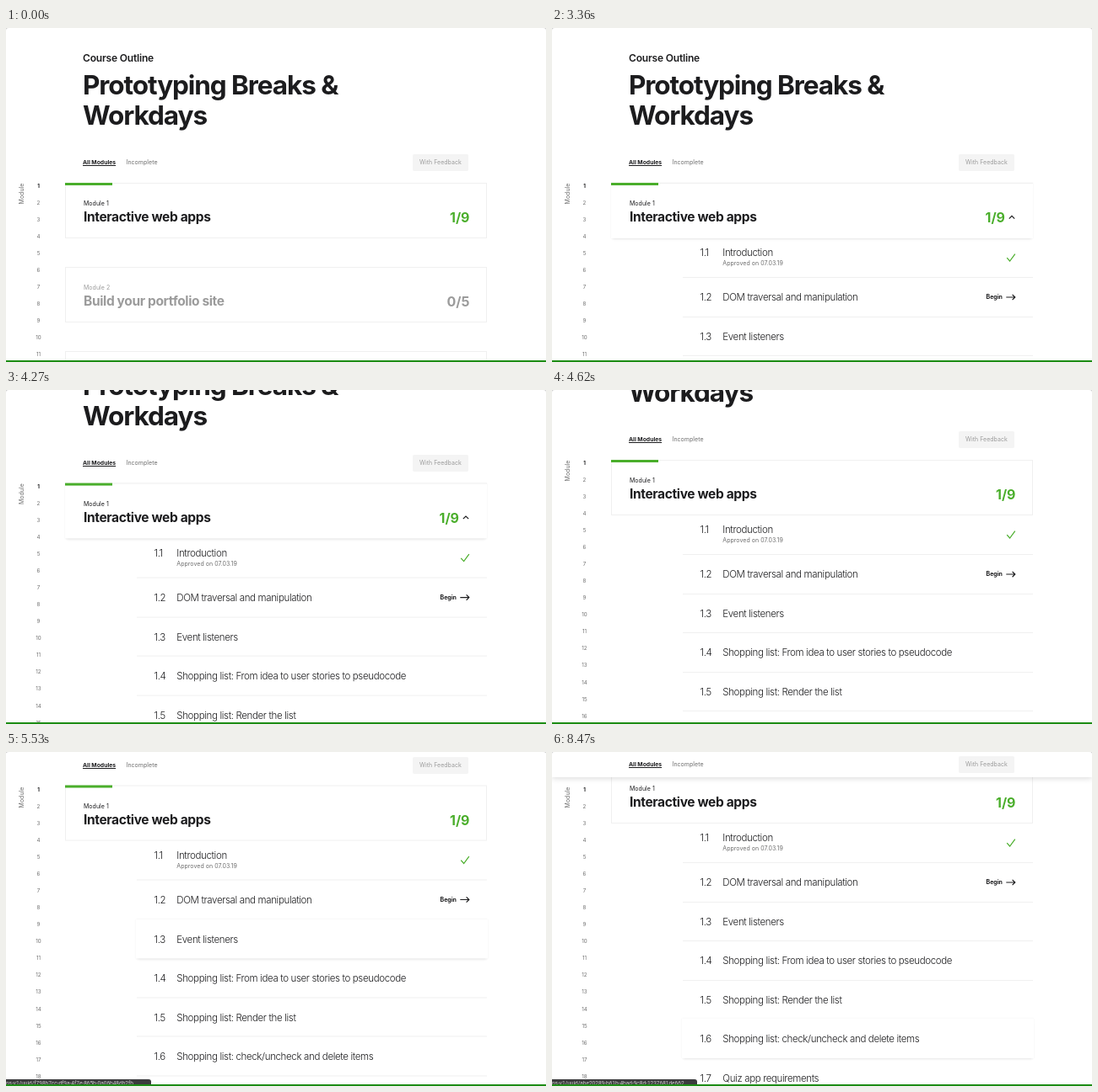
An HTML page that plays this animation: 640x397 px, repeating every 8.61 s.

```html
<!DOCTYPE html>
<html lang="en">
<head>
<meta charset="utf-8">
<title>Course outline</title>
<style>
  html, body { margin: 0; width: 100%; height: 100%; overflow: hidden; background: #ccc; }
  #stage { position: relative; width: 640px; height: 397px; overflow: hidden; background: #fff;
    border-radius: 3px 3px 0 0; color: #1c1c1e; font: 400 7px Inter, sans-serif; }
  #stage div, #stage svg { position: absolute; box-sizing: border-box; }
  /* zero line height centres capitals on the given y */
  .t { white-space: pre; line-height: 0; }
  .small { font-size: 7px; letter-spacing: .005em; }
  .kicker { font-size: 12px; font-weight: 600; letter-spacing: -.015em; }
  .title { font-size: 31.5px; font-weight: 700; letter-spacing: -.034em; }
  .name { font-size: 15.5px; font-weight: 700; letter-spacing: -.023em; }
  .score { font-size: 16px; font-weight: 700; }
  .row { font-size: 11.5px; font-weight: 350; letter-spacing: -.031em; }
  .tab { font-size: 6.8px; font-weight: 700; text-decoration: underline 1px; text-underline-offset: .5px; }
  .bold { font-size: 7px; font-weight: 700; }
  .mute { color: #6d6d6d; }
  .pale { color: #9b9b9b; }
  .green { color: #4aae2b; }
  .card { left: 70px; width: 500px; height: 66px; border: 1px solid #f0f0f0; background: #fff; }
  .lift { background: #fff; box-shadow: 0 3px 3px -2px rgba(0,0,0,.09), 0 0 2px rgba(0,0,0,.06); }
  .rule { left: 155px; width: 415px; height: 1px; background: #f0f0f0; }
  svg { overflow: visible; fill: none; stroke-width: 1.2; }
  #scroll, #side, #rest { left: 0; top: 0; width: 640px; }
  #list { left: 0; top: 250px; width: 640px; overflow: hidden; }
  #rowLift { left: 154px; width: 417px; height: 47px; }
  #headLift { left: 70px; top: 184px; width: 500px; height: 66px; border-top: 1px solid #f0f0f0; }
  #bar { left: 0; width: 640px; height: 30px; background: #fff; }
  #button { left: 482px; top: 5px; width: 66px; height: 20px; background: #f4f4f4; border-radius: 2px; }
  #progress { left: 70px; top: 184px; width: 56px; height: 3px; background: #4aae2b; }
  #status { left: 0; top: 389px; width: 172px; height: 8px; background: #3b3b3d; overflow: hidden;
    border-top-right-radius: 3px; color: #c8c8c8; font: 6.5px Roboto, sans-serif; }
  #edge { left: 0; top: 395px; width: 640px; height: 2px; background: #1c8c14; }
</style>
</head>
<body>
<div id="stage">
  <div id="scroll">
    <div id="list"><div id="rowLift" class="lift"></div></div>
    <div id="rest"></div>
    <div class="card" style="top:184px"></div>
    <div id="headLift" class="lift"></div>
    <div id="progress"></div>
    <svg id="chevron" style="left:541px;top:221px" width="8" height="8" stroke="#1c1c1e"><path d="M.8 2.4 4 5.6 7.2 2.4"/></svg>
  </div>
  <div id="side"></div>
  <div id="bar"><div id="button"></div></div>
  <div id="status"></div>
  <div id="edge"></div>
</div>
<script>
const $ = id => document.getElementById(id);
const LOOP = 8610, STEP = 70, ROW = 46.5, LIST = 9 * ROW;

function add(parent, cls, style) {
  const el = document.createElement('div');
  el.className = cls;
  Object.assign(el.style, style);
  parent.append(el);
  return el;
}
function text(parent, str, x, y, cls, align = 'left') {
  const at = align === 'right' ? { right: 640 - x + 'px' } : { left: x + 'px' };
  const el = add(parent, 't ' + cls, { top: y + 'px', ...at });
  if (align === 'center') el.style.transform = 'translateX(-50%)';
  el.textContent = str;
  return el;
}
function icon(parent, x, y, color, path) {
  parent.insertAdjacentHTML('beforeend',
    `<svg style="left:${x}px;top:${y}px" width="12" height="12" stroke="${color}"><path d="${path}"/></svg>`);
}

const page = $('scroll'), list = $('list'), rest = $('rest'), side = $('side'), bar = $('bar');

text(page, 'Course Outline', 91, 35.5, 'kicker');
text(page, 'Prototyping Breaks &', 91, 68, 'title');
text(page, 'Workdays', 91, 104, 'title');
text(page, 'Module 1', 92, 208.5, 'small');
text(page, 'Interactive web apps', 92, 225, 'name');
const score = text(page, '1/9', 549.5, 225, 'score green', 'right');

text(bar, 'All Modules', 91, 15.2, 'tab');
text(bar, 'Incomplete', 142.5, 15.2, 'small mute');
text(bar, 'With Feedback', 490, 15.2, 'small pale');

[284, 384].forEach((y, i) => {
  add(rest, 'card', { top: y + 'px' });
  text(rest, 'Module ' + (i + 2), 92, y + 24.5, 'small pale');
  if (i) return;
  text(rest, 'Build your portfolio site', 92, y + 41, 'name pale');
  text(rest, '0/5', 549.5, y + 41, 'score pale', 'right');
});

const lessons = ['Introduction', 'DOM traversal and manipulation', 'Event listeners',
  'Shopping list: From idea to user stories to pseudocode', 'Shopping list: Render the list',
  'Shopping list: check/uncheck and delete items', 'Quiz app requirements'];
const rules = lessons.map((name, i) => {
  const y = i ? (i + .5) * ROW + .3 : 16.5;
  const rule = add(list, 'rule', { top: (i + 1) * ROW - .5 + 'px' });
  list.append($('rowLift'));
  text(list, '1.' + (i + 1), 175.5, y, 'row').style.zIndex = 1;
  text(list, name, 202.3, y, 'row').style.zIndex = 1;
  return rule;
});
text(list, 'Approved on 07.03.19', 202.3, 30.2, 'small mute').style.zIndex = 1;
text(list, 'Begin', 514.5, 69.8, 'bold').style.zIndex = 1;
icon(list, 538, 17, '#4aae2b', 'M1.2 6.2 4.6 10 10.8 1.6');
icon(list, 538, 63.5, '#1c1c1e', 'M.3 6H10.8M7.6 2.8 10.8 6 7.6 9.2');
list.querySelectorAll('svg').forEach(el => el.style.zIndex = 1);

text(side, 'Module', 18.5, 197, 'small mute', 'center').style.transform = 'translateX(-50%) rotate(-90deg)';
for (let n = 1; n < 20; n++) {
  text(side, n, 38.5, 187.5 + (n - 1) * 20.08, n > 1 ? 'mute' : 'bold', 'center').style.fontSize = '6.2px';
}

const address = text($('status'), '', 0, 5.3, '');
const links = ['', '36005cc2-2ea0-4f7c-a056-c75bae824678', 'f798b7cc-df9a-4f7e-865b-0a06b48db2fb',
  '75fa67b6-663f-49f7-a866-6084c2b23994', 'abe20289-b61b-4bad-9c8d-1237681de662',
  'abe20289-b61b-4bad-9c8d-1237681de662'];

// time, offset, speed in px per ms
const path = [[3360, 0, 0], [4270, 73.4, .08], [4900, 119.4, .055], [5530, 144.5, .035], [6090, 165, 0]];
// time from which a row is under the pointer
const hovers = [[0, -1], [4760, 1], [5250, 2], [5950, 3], [8050, 4], [8120, 5]];

const clamp = v => Math.min(1, Math.max(0, v));
const ease = (t, from, ms) => { const u = clamp((t - from) / ms); return u * u * (3 - 2 * u); };

function offset(t) {
  const i = path.findIndex(p => p[0] > t);
  if (i < 0) return path[path.length - 1][1];
  if (!i) return 0;
  const [t0, a, va] = path[i - 1], [t1, b, vb] = path[i];
  const d = t1 - t0, u = (t - t0) / d, w = 1 - u;
  return a * w * w * (1 + 2 * u) + b * u * u * (3 - 2 * u) + d * u * w * (va * w - vb * u);
}

function draw(t) {
  const y = offset(t), open = ease(t, 2590, 420);
  const lift = ease(t, 1330, 350) * (1 - ease(t, 4340, 210));
  const row = hovers.filter(h => h[0] <= t).pop()[1];

  page.style.transform = `translateY(${-y}px)`;
  side.style.transform = `translateY(${-Math.min(y, 143)}px)`;
  bar.style.top = Math.max(145.3 - y, 0) + 'px';
  bar.style.boxShadow = y > 145.3 ? '0 1px 7px rgba(0,0,0,.16)' : 'none';

  list.style.height = open * LIST + 'px';
  list.style.opacity = open;
  rest.style.transform = `translateY(${open * LIST}px)`;

  $('headLift').style.opacity = lift;
  score.style.transform = `translateX(${-12.5 * lift}px)`;
  $('chevron').style.opacity = lift;
  $('chevron').style.transform = `rotate(${180 * open}deg)`;

  $('rowLift').style.display = row < 0 ? 'none' : 'block';
  $('rowLift').style.top = row * ROW - .5 + 'px';
  rules.forEach((el, i) => el.style.visibility = i === row ? 'hidden' : 'visible');
  $('status').style.display = row < 0 ? 'none' : 'block';
  address.textContent = 'ns-v1/uuid/' + (links[row] || '');
}

function tick(now) {
  draw(Math.floor(now % LOOP / STEP) * STEP);
  requestAnimationFrame(tick);
}
draw(0);
requestAnimationFrame(tick);
</script>
</body>
</html>
```
